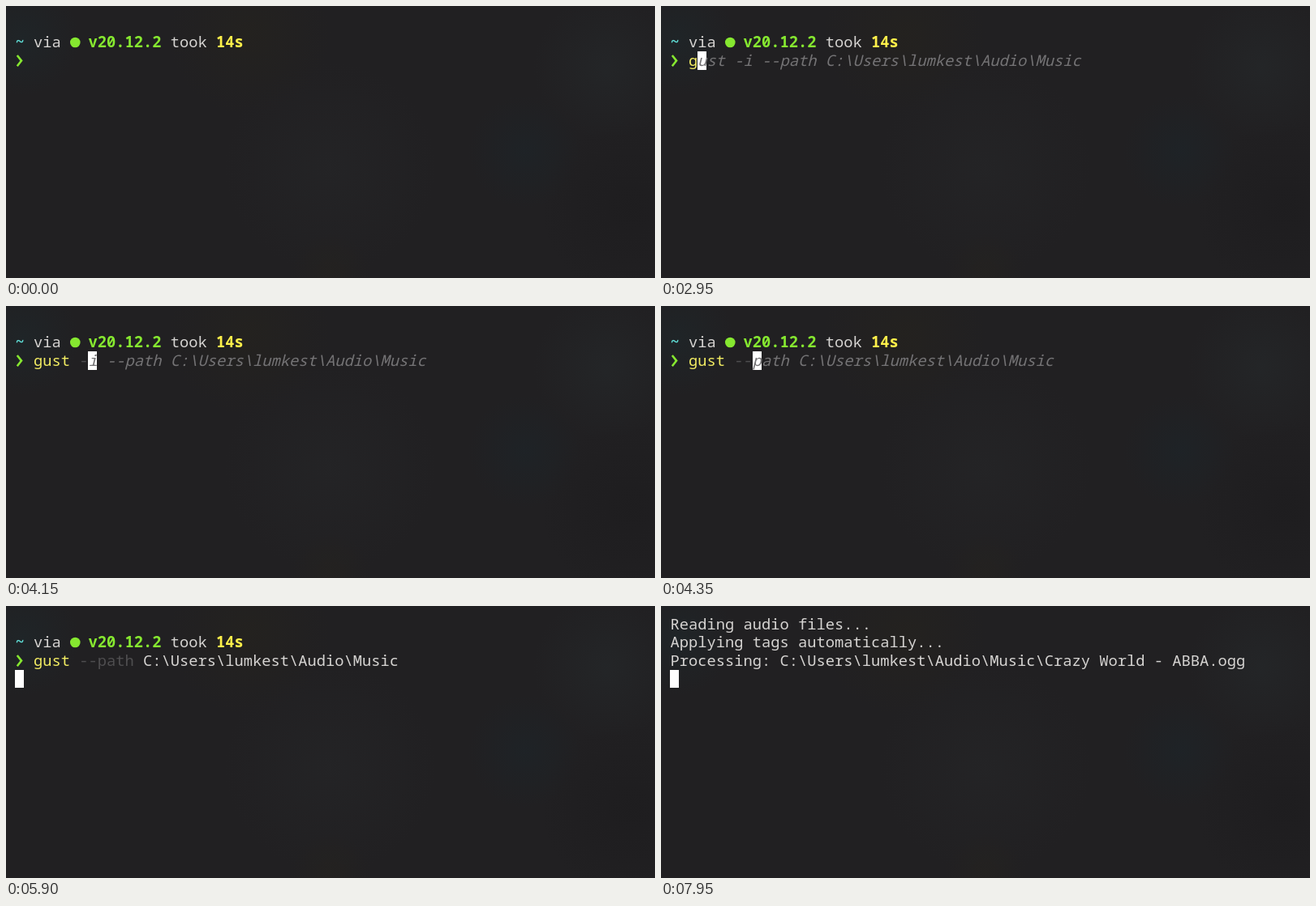
Animation of 800 by 336 pixels, one loop 8000 ms. Source, as an HTML page with a canvas:

```html
<!DOCTYPE html>
<html lang="en">
<head>
<meta charset="utf-8">
<title>Terminal session</title>
<style>
html, body { margin: 0; width: 100%; height: 100%; overflow: hidden; background: #212022; }
canvas { display: block; }
</style>
</head>
<body>
<canvas id="stage" width="800" height="336"></canvas>
<script>
const ctx = document.getElementById('stage').getContext('2d');
const LOOP = 8000, CELL = 11.25, ROW = 22.5, LEFT = 11.4, TOP = 11.5;
const FONT = '18.75px "Noto Sans Mono", "DejaVu Sans Mono", monospace';
const PALE = '#d6d4d2', GREEN = '#86e830', TEAL = '#5fdcd4', GOLD = '#fff04a',
      YELLOW = '#f2ec62', FLAG = '#4f4e50', HINT = '#747375', WHITE = '#ffffff';

const folder = 'C:\\Users\\lumkest\\Audio\\Music';
const oldCommand = 'gust -i --path ' + folder;
const command = 'gust --path ' + folder;

// [time, characters typed, command shown]
const typing = [
  [2950, 1, oldCommand], [3100, 2, oldCommand], [3300, 3, oldCommand], [3500, 4, oldCommand],
  [4000, 5, oldCommand], [4150, 6, oldCommand], [4350, 7, command], [4650, 8, command],
  [4750, 9, command], [5400, command.length, command]
];

// Soft patches of light behind the terminal: x, y, radius, colour
const patches = [
  [20, 40, 70, '31,37,40'], [300, 35, 100, '36,34,31'], [400, 200, 130, '36,36,38'],
  [640, 180, 70, '30,35,39'], [740, 75, 90, '36,38,40'], [770, 250, 110, '30,29,31'],
  [400, 330, 50, '36,34,32']
];

function write(text, col, row, color, style = '') {
  ctx.font = style + ' ' + FONT;
  ctx.fillStyle = color;
  ctx.fillText(text, LEFT + col * CELL, TOP + row * ROW + 17);
}

function cursor(col, row) {
  ctx.fillStyle = WHITE;
  ctx.fillRect(Math.round(11.25 + col * CELL), Math.floor(TOP + row * ROW), 11, row === 2 ? 23 : 22);
}

function background() {
  ctx.fillStyle = '#212022';
  ctx.fillRect(0, 0, 800, 336);
  for (const [x, y, r, rgb] of patches) {
    const glow = ctx.createRadialGradient(x, y, 0, x, y, r);
    glow.addColorStop(0, `rgba(${rgb},.9)`);
    glow.addColorStop(1, `rgba(${rgb},0)`);
    ctx.fillStyle = glow;
    ctx.fillRect(x - r, y - r, 2 * r, 2 * r);
  }
}

function prompt() {
  write('~', 0, 1, TEAL, 'bold');
  write('via', 2, 1, PALE);
  ctx.fillStyle = GREEN;
  ctx.beginPath();
  ctx.arc(85.3, 45, 6.3, 0, Math.PI * 2);
  ctx.fill();
  write('v20.12.2', 8, 1, GREEN, 'bold');
  write('took', 17, 1, PALE);
  write('14s', 22, 1, GOLD, 'bold');

  ctx.strokeStyle = GREEN;
  ctx.lineWidth = 2.6;
  ctx.beginPath();
  ctx.moveTo(13.8, 61);
  ctx.lineTo(19, 67.6);
  ctx.lineTo(13.8, 74.2);
  ctx.stroke();
}

function commandLine(t) {
  const step = typing.findLast(s => t >= s[0]);
  const [, count, text] = step || [0, 0, ''];
  const flagEnd = command.indexOf(' C:');
  if (t >= 5900) cursor(0, 3);
  else if (t >= 1000) cursor(2 + count, 2);
  write(text.slice(0, Math.min(count, 4)), 2, 2, YELLOW);
  write(text.slice(5, Math.min(count, flagEnd)), 7, 2, FLAG);
  write(text.slice(flagEnd + 1, Math.max(count, flagEnd + 1)), 3 + flagEnd, 2, count > flagEnd ? PALE : 'transparent');
  write(text.slice(count), 2 + count, 2, HINT, 'italic');
}

function output() {
  write('Reading audio files...', 0, 0, PALE);
  write('Applying tags automatically...', 0, 1, PALE);
  write('Processing: ' + folder + '\\Crazy World - ABBA.ogg', 0, 2, PALE);
}

function draw(now) {
  const t = now % LOOP;
  background();
  if (t < 7900) {
    prompt();
    commandLine(t);
  } else {
    cursor(0, 3);
    if (t >= 7950) output();
  }
  requestAnimationFrame(draw);
}
requestAnimationFrame(draw);
</script>
</body>
</html>
```
